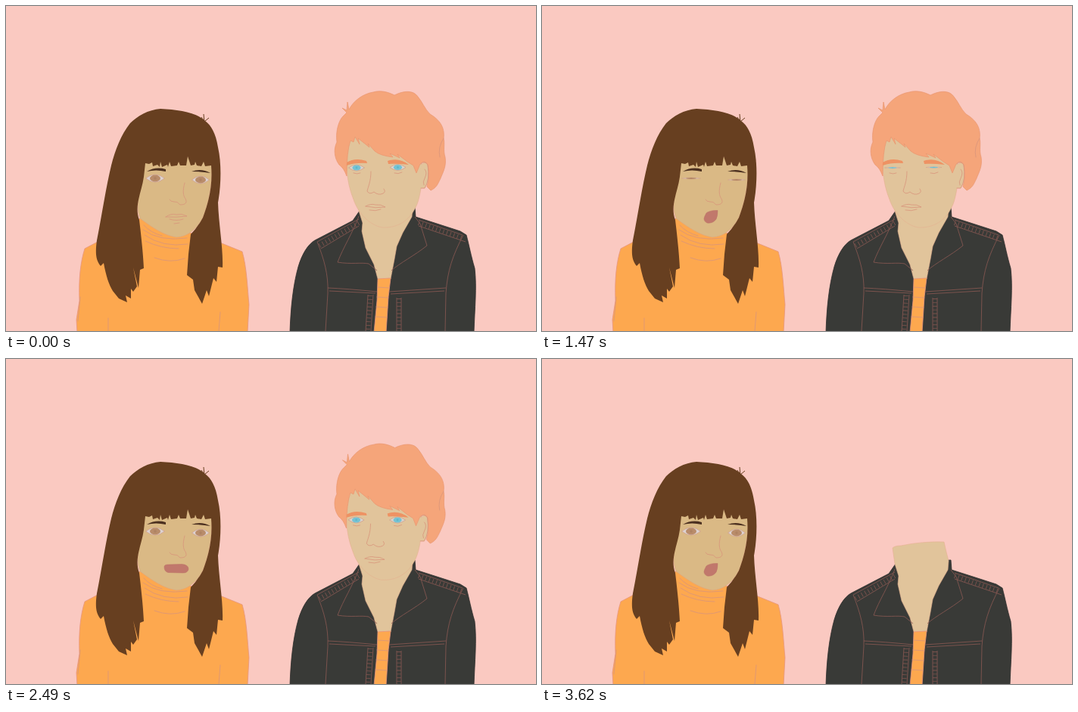
Animation of 700 by 430 pixels, one loop 3650 ms. Source, as an HTML page:

```html
<!DOCTYPE html>
<html lang="en">
<head>
<meta charset="utf-8">
<title>Two portraits</title>
<style>
  html, body { margin: 0; width: 100%; height: 100%; overflow: hidden; background: #fac9c1; }
  svg { display: block; width: 700px; height: 430px; }
  .line { fill: none; stroke: #d9957b; stroke-width: .8; stroke-linecap: round; }
  .stitch { fill: none; stroke: #8c5a53; stroke-width: .8; }
  .rungs { fill: none; stroke: #7a524c; stroke-width: 6; stroke-dasharray: .9 4; }
  .skinW { fill: #dab985; stroke: #dda47f; stroke-width: .6; }
  .skinM { fill: #e1c49b; stroke: #e5b190; stroke-width: .6; }
  .orange { fill: #fda84f; stroke: #e8957d; stroke-width: .8; }
  .brown { fill: #673f20; }
  .ginger { fill: #f5a57a; stroke: #ea966f; stroke-width: .7; }
  .lips { fill: #c1786c; stroke: #b96f64; stroke-width: .5; }
  .white { fill: #fff; }
  .hide { display: none; }
</style>
</head>
<body>
<svg viewBox="0 0 700 430">
  <g id="woman">
    <path class="orange" d="M94 432L93 415L97 390C96 362 98 340 104 321L121 312L177 281L243 300L285 314L312 325C318 345 319 375 321 395L319 432Z"/>
    <path class="line" d="M182 290Q191 300 206 304M181 296Q202 312 239 307M183 303Q207 320 240 315M184 311Q205 321 228 321M196 333Q217 341 236 334M135 413V430M283 405L281 430M98 385L95 417"/>
    <path class="skinW" d="M181 200H272C273 235 269 256 260 280C251 297 239 305 225 306C205 303 187 288 177 281C169 262 179 245 181 200Z"/>
    <path class="brown" d="M204 136C188 137 173 146 164 155C152 170 144 191 139 211C132 240 126 280 120 310C118 325 118 336 125 344L129 340C132 357 136 369 141 377L149 387L160 392L158 383L165 387L165 374L168 378L173 371L168 346L175 373L177 349L182 347C181 325 178 300 176 283C169 264 179 247 182 226L184 208L189 209L193 207L194 212L200 210L203 213L204 206L206 213L213 210L214 213L216 206L218 212L226 211L228 206L230 211L238 211L240 199L244 211L249 210L250 206L252 211L258 212L261 206L263 212L271 211C273 235 269 256 260 280Q253 293 244 302L241 328L239 356L247 362L249 376L259 394L265 376L268 384L274 360L278 365L280 345L286 346C287 320 281 290 280 260C284 238 285 209 280 187C277 168 271 158 263 152C252 141 228 137 204 136Z"/>
    <path d="M262 154L261 143M262 153L268 148M262 153L258 147M275 203L272 237" fill="none" stroke="#673f20"/>
    <path d="M186 219Q198 212 211 216L211 219Q198 216 186 219ZM245 219Q258 214 270 221Q258 219 245 219Z" fill="#4c3020"/>
    <path class="line" d="M236 234C233 245 234 251 237 255C240 261 236 263 230 263Q226 258 222 259Q217 259 216 256"/>
    <g id="mouths">
      <path class="line" d="M211 279Q218 274 225 276Q232 274 239 278Q225 280 211 279M216 282Q225 285 234 282M222 288L229 287"/>
      <path class="lips" d="M212 278Q219 274 226 275Q233 274 239 277Q234 280 226 279Q219 280 212 278Z"/>
      <path class="lips" d="M209 275Q209 272 214 272L232 271.500Q241 272 241 278Q240 283 234 283L214 282.500Q209 281 209 275Z"/>
      <path class="lips" d="M217 274Q222 270 232 270.500Q232 278 230 282Q226 288 218 287Q212 284 215 278Z"/>
    </g>
  </g>

  <g id="jacket">
    <path d="M375 432C376 400 379 370 386 345C391 328 399 315 408 310L458 284L467 271L540 266L541 279L566 287L600 298L608 303C612 318 614 330 619 347C622 372 619 400 618 432Z" fill="#393a37" stroke="#2c2d2b" stroke-width=".8"/>
    <path class="skinM" d="M463 250Q466 247 474 247Q502 241 531 242Q533 252 537 267L536 279L524 300L516 318L513 335L508 361H491L486 342L475 320L470 298L471 287L466 271Z"/>
    <path class="orange" d="M491 361L508 360L505 385L502 432H486L490 390Z"/>
    <path class="line" d="M491 372L506 373M490 385L505 386M489 398L504 399M488 411L503 412"/>
    <path class="stitch" d="M411 312L466 282M416 321L466 291M466 278C458 300 445 320 438 339C455 342 470 339 479 341L490 350M411 312C420 335 426 355 425 380L422 430M425 373Q450 374 490 378M427 377L488 380M540 279L547 288L556 317C540 330 520 340 509 350M545 283L603 303M545 291L607 312M604 303C590 330 583 350 581 380L580 430M506 378L581 373M508 381L579 377M478 382L475 430M485 382L482 430M516 386L516 430M522 386V430"/>
    <path class="rungs" d="M414 317L466 287M545 287L605 308M481 383L478 430M519 387V430"/>
  </g>

  <g id="head">
    <g id="whole">
      <path class="skinM" d="M452 165L550 180L549 210Q553 204 557 210Q560 232 553 241L548 241C546 255 543 264 539 270C530 287 513 294 497 293C480 290 465 274 459 256C449 232 447 200 452 165Z"/>
      <path class="ginger" d="M450 141L444 135L450 138L451 127L453 137C459 125 472 116 485 114C495 111 505 114 513 118C525 112 538 111 544 120C550 127 553 136 560 143C572 150 580 160 578 175C580 183 577 190 580 200C582 212 577 220 574 228C570 236 569 240 561 244L556 239Q560 225 557 210Q552 204 547 209L542 221L538 211L530 206L517 196L520 201L507 195L511 200Q494 198 487 192L478 182L480 187L465 175L467 183L461 173L459 180L455 178Q450 192 450 225Q446 214 440 210C434 202 432 190 437 180C435 165 440 150 446 145Z"/>
      <path class="line" d="M578 175Q570 187 573 200M548 209Q553 203 557 210Q560 230 553 241L548 241M553 216Q557 220 553 228Q550 233 552 237"/>
      <path d="M450 207Q461 200 476 205L477 208Q462 207 450 211ZM504 205Q519 200 532 210Q517 208 505 209Z" fill="#ee9263"/>
      <path class="line" d="M482 219C482 232 478 240 477 245Q480 250 486 246Q492 251 498 248Q502 246 499 242M475 265Q482 261 488 263Q495 262 501 266Q488 268 475 265M480 270Q488 272 495 269M459 221Q464 223 468 221M513 221Q518 223 523 220"/>
    </g>
  </g>
  <g id="burst"></g>
</svg>

<script>
const LOOP = 3650, BLAST = 2620;
const CENTER = [497, 215];
const $ = id => document.getElementById(id);
const clamp = (v, lo = 0, hi = 1) => Math.min(hi, Math.max(lo, v));

function add(parent, tag, attrs) {
  const el = document.createElementNS("http://www.w3.org/2000/svg", tag);
  for (const key in attrs) el.setAttribute(key, attrs[key]);
  return parent.appendChild(el);
}

function eye(parent, x, y, w, h, white, iris, pupil) {
  const el = add(parent, "g");
  add(el, "path", { d: `M${-w} 0Q0 ${-h * 2} ${w} 0Q0 ${h * 2} ${-w} 0Z`, fill: white, stroke: "#d09a83", "stroke-width": .7 });
  add(el, "ellipse", { rx: h * 1.4, ry: h * .88, fill: iris });
  add(el, "circle", { r: h * .35, fill: pupil });
  return { el, x, y };
}

function puff(parent, r) {
  for (let i = 0; i < 6; i++) {
    const a = i * Math.PI / 3;
    add(parent, "circle", { cx: r * .58 * Math.cos(a), cy: r * .58 * Math.sin(a), r: r * .4, class: "white" });
  }
  add(parent, "circle", { r: r * .6, class: "white" });
}

const woman = $("woman"), head = $("head"), burst = $("burst");
const herEyes = [[197, 228, 12.5], [257, 230, 11.5]].map(([x, y, w]) =>
  eye(woman, x, y, w, 5, "#ddd3d0", "#b98c6a", "#ae8262"));
const hisEyes = [[463, 214, 10.5], [517.5, 213.5, 10.5]].map(([x, y, w]) =>
  eye(head, x, y, w, 4, "#d9d3cd", "#76c2d2", "#5cb8cd"));

// Shards: position shortly after the blast, outline around it, style
const pieces = [
  [407, 183, "M-17 -5L-3 -1L2 -13L5 -2L13 -13L11 1L5 15Z", "ginger"],
  [574, 182, "M-17 0L-4 -7L11 -8L6 -2L17 5L-4 6Z", "ginger"],
  [494, 177, "M-16 11L-7 -10L-2 -7L3 -14L6 -6L15 -7L9 1L15 6L6 8L3 13L-6 8Z", "skinM"],
  [421, 236, "M-15 1L-1 -5L3 -10L7 -4L15 1L9 8L-1 9Z", "skinM"],
  [557, 219, "M-13 -3L-1 -6L8 -8L6 -1L13 1L4 4L6 9L-5 7L-11 3Z", "skinM"],
  [498, 231, "M-4 -15L-11 9Q-7 16 0 12Q11 16 11 10L4 0Z", "skinM"],
  [490, 269, "M-9 -6Q0 -10 8 -5Q12 2 6 7Q-3 11 -7 5Z", "lips"],
  [507, 224, "M7 -8L2 4L-5 7L-4 0Z", "white"],
  [449, 208, 8], [457, 261, 16], [539, 239, 6]
].map(([x, y, shape, cls]) => {
  const el = add(burst, "g");
  if (cls) add(el, "path", { d: shape, class: cls });
  else puff(el, shape);
  return { el, x, y };
});

const BLINKS = [[325, 200], [1515, 200], [2180, 130], [2620, 110], [3210, 130]];
const openness = t => Math.min(...BLINKS.map(([mid, half]) => clamp(Math.abs(t - mid) / half, .08)));

// Mouth shapes: 0 closed, 1 parted, 2 wide, 3 round
const SPEECH = [[0, 0], [150, 1], [250, 3], [350, 2], [450, 1], [550, 0], [650, 1], [780, 3], [910, 2], [1040, 1],
  [1170, 0], [1300, 1], [1420, 3], [1540, 2], [1640, 1], [1730, 0], [1830, 1], [1950, 2], [2130, 3], [2230, 1],
  [2330, 2], [2570, 3], [2660, 1], [2850, 0], [2990, 1], [3090, 3], [3490, 1], [3620, 3]];
const mouths = [...$("mouths").children];

function show(el, on) { el.classList.toggle("hide", !on); }

function draw(t) {
  const open = openness(t);
  const shape = SPEECH.findLast(([start]) => start <= t)[1];
  mouths.forEach((m, i) => show(m, i === shape));
  for (const { el, x, y } of herEyes) el.setAttribute("transform", `translate(${x} ${y}) scale(1 ${open})`);

  // The burst pauses briefly before its last stretch
  const u = t < 2850 ? t : Math.max(2850, t - 100);
  const blown = t >= BLAST;
  const spread = 1.55 * (1 - Math.exp(-Math.max(0, u - BLAST) / 125));
  const size = clamp((3030 - u) / 110);
  const shake = blown ? 0 : clamp((t - 1830) / 500) * Math.sin((t - 2020) * Math.PI / 45);
  head.setAttribute("transform", `translate(${-shake} ${-shake * .7}) rotate(${shake * .6} 497 270)`);
  show($("whole"), !blown);
  show(burst, blown && size > 0);

  for (const { el, x, y } of hisEyes) {
    const drift = blown ? (spread - 1) * .25 : 0;
    const ex = x + (x - CENTER[0]) * drift, ey = y + (y - CENTER[1]) * drift;
    const s = blown ? size : 1;
    el.setAttribute("transform", `translate(${ex} ${ey}) scale(${s} ${s * (blown ? .85 : open)})`);
  }
  for (const { el, x, y } of pieces) {
    const px = CENTER[0] + (x - CENTER[0]) * spread, py = CENTER[1] + (y - CENTER[1]) * spread;
    el.setAttribute("transform", `translate(${px} ${py}) rotate(${(spread - 1) * 25}) scale(${size})`);
  }
}

function tick() {
  draw(performance.now() % LOOP);
  requestAnimationFrame(tick);
}
tick();
</script>
</body>
</html>
```
